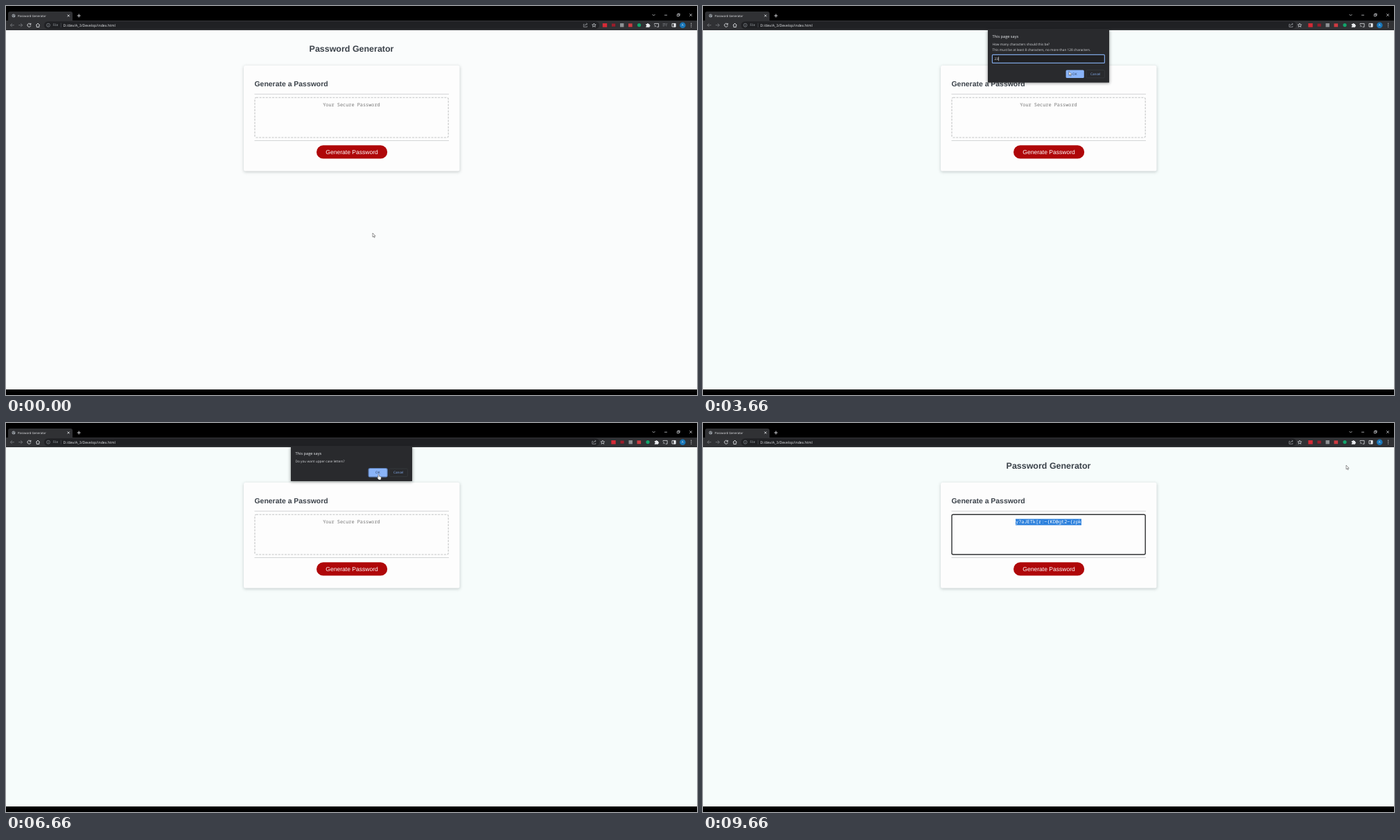
An HTML page that plays this animation: 997 by 562 pixels, repeating every 9730 ms.

```html
<!DOCTYPE html>
<html lang="en">
<head>
<meta charset="utf-8">
<title>Password Generator</title>
<style>
  html, body { margin: 0; width: 100%; height: 100%; overflow: hidden; background: #000; }
  svg { display: block; width: 100%; height: 100%; }
  text { text-rendering: geometricPrecision; white-space: pre; }
  .ui { font-family: "Open Sans", "Noto Sans", sans-serif; }
  .page { font-family: "Liberation Sans", Arial, sans-serif; fill: #3b424a; }
  .mono { font-family: "Noto Sans Mono", "DejaVu Sans Mono", monospace; font-size: 6.88px; }
  .bold { font-weight: bold; }
  .mid { text-anchor: middle; }
  .line { fill: none; stroke: #dfe1e5; stroke-width: .9; }
</style>
</head>
<body>
<svg viewBox="0 0 997 562" preserveAspectRatio="none">
  <defs>
    <filter id="soft" x="-10%" y="-10%" width="120%" height="125%"><feGaussianBlur stdDeviation="2"/></filter>
  </defs>

  <!-- Browser frame -->
  <rect width="997" height="562" fill="#000"/>
  <path d="M0 21H3V11q0-3 3-3H93q3 0 3 3V21H997V35H0Z" fill="#303134"/>
  <rect x="55" y="22.2" width="801" height="11" rx="5.5" fill="#202124"/>
  <g class="ui">
    <circle cx="11" cy="14" r="2.5" fill="#9aa0a6"/>
    <path d="M9 13.2l2 .7-.6 2M11.5 11.8l.3 1.3 1.5.6" class="line" style="stroke:#35363a;stroke-width:.6"/>
    <text x="17" y="15.6" font-size="4.3" fill="#e8eaed">Password Generator</text>
    <text x="67.5" y="29.4" font-size="4.8" fill="#9aa0a6">File</text>
    <text x="82.5" y="29.5" font-size="5.2" fill="#e8eaed">D:/dev/A_3/Develop/index.html</text>
  </g>
  <g class="line">
    <path d="M88.7 12.5l3 3m0-3l-3 3M102.7 14h5m-2.5-2.5v5"/>
    <path d="M11.8 27.7H6.3m2.5-2.5l-2.5 2.5 2.5 2.5M18.2 27.7h5.5m-2.5-2.5l2.5 2.5-2.5 2.5" stroke="#74777b"/>
    <path d="M35.4 26.2a2.5 2.5 0 1 0 .4 2.2M35.8 24.8v2h-2M43.2 27.8l2.8-2.8 2.8 2.8M44.2 27.3v3.2h3.6v-3.2"/>
    <path d="M61 27.3v1.8M61 25.9v.5M58.5 27.7a2.5 2.5 0 1 0 5 0a2.5 2.5 0 1 0-5 0" stroke="#9aa0a6" stroke-width=".6"/>
    <path d="M79.3 24.5v6.5" stroke="#5f6368" stroke-width=".5"/>
    <path d="M932.5 12l2 2 2-2M950 13.2h4M968.3 12h2.8v2.8h-2.8zM969.3 12v-1h2.8v2.8h-1M986.2 11.2l3.6 3.6m0-3.6l-3.6 3.6" stroke-width=".7"/>
    <path d="M961 25.4h5v4.6h-5z"/>
  </g>
  <rect x="963.5" y="25" width="2.8" height="5.4" fill="#e8eaed"/>
  <circle cx="976.3" cy="27.7" r="4.3" fill="#1976b8"/>
  <text class="ui mid" x="976.3" y="29.4" font-size="4.5" fill="#d7e8f5">A</text>
  <path d="M988.7 25.2v.1m0 2.3v.1m0 2.3v.1" class="line" stroke-linecap="round" style="stroke-width:1.2"/>
  <g id="tools">
    <path class="line" style="stroke:#a5a8ac;stroke-width:.7" d="M834.5 26.3h-1.2v4h5v-1.5M835 28.8q.2-2.8 3.5-2.8m-1.2-1.3l1.4 1.3-1.4 1.3"/>
    <path class="line" style="stroke-width:.7" d="M848.4 25l.8 1.8 2 .2-1.5 1.3.5 2-1.8-1.1-1.8 1.1.5-2-1.5-1.3 2-.2z"/>
    <rect x="860.8" y="25" width="6.4" height="5.6" fill="#d52a36"/>
    <rect x="874" y="25.5" width="5.2" height="4.2" fill="#9c1c2a"/>
    <rect x="886" y="25" width="5.4" height="5.4" fill="#8e9194"/>
    <rect x="898" y="25.3" width="5.6" height="5" fill="#cf3b42"/>
    <circle cx="913.5" cy="27.6" r="2.6" fill="#12a56b"/>
    <path fill="#e8eaed" d="M923.3 26h1.6a1.1 1.1 0 0 1 2.2 0h1.4v1.5a1.1 1.1 0 0 1 0 2.2v1h-5.2v-1.3a.9.9 0 0 0 0-1.8z"/>
    <path class="line" style="stroke-width:.8" d="M935.6 26.8v-1.4h6v4.8h-2.4M935.6 28.2q2 0 2 2M935.6 29.7v.5"/>
  </g>
  <path id="media" class="line" style="stroke:#74777b;stroke-width:.8" d="M947.6 25.5h4M947.6 27.2h4M947.6 29h2.4M952.8 29.5v-3.8h1.5"/>

  <!-- Page -->
  <rect id="paper" y="35" width="997" height="519" fill="#f6fcfb"/>
  <text class="page bold mid" x="498.5" y="66.2" font-size="12.46">Password Generator</text>
  <rect x="343" y="87" width="312" height="153" rx="2" fill="#8a9696" opacity=".45" filter="url(#soft)"/>
  <rect x="343" y="86" width="311.5" height="152.5" rx="2.5" fill="#fdfdfd"/>
  <text class="page bold" x="358.5" y="115.6" font-size="10.45">Generate a Password</text>
  <path d="M358.5 127.3H639M358.5 194.5H639" stroke="#cfd1d2" stroke-width=".9"/>
  <rect id="box" x="359" y="132.3" width="279.2" height="57.7" rx="2" fill="#fdfdfd"/>
  <rect id="selection" x="451" y="138.6" width="95" height="9" fill="#2a7fdc"/>
  <text id="output" class="mono mid" x="498.5" y="145.4"></text>
  <rect x="448" y="201.3" width="102.2" height="19.3" rx="9.65" fill="#af0709"/>
  <text class="page mid" x="499.1" y="214" font-size="8.55" style="fill:#fff">Generate Password</text>

  <!-- Dialog -->
  <g id="dialog" class="ui">
    <rect id="shade" x="410.5" y="35" width="176" fill="#000" opacity=".4" filter="url(#soft)"/>
    <rect id="panel" x="411" y="33" width="175" fill="#292a2d"/>
    <text x="417.5" y="46.1" font-size="5.62" fill="#e8eaed">This page says</text>
    <text id="message" x="417.5" y="57.2" font-size="4.78" fill="#d5d7da"></text>
    <g id="field">
      <text x="417.5" y="65.1" font-size="4.78" fill="#d5d7da">This must be at least 8 characters, no more than 128 characters.</text>
      <rect x="417.4" y="70.4" width="162" height="12" rx="1" fill="#202124" stroke="#7da4e0" stroke-width="1.2"/>
      <text id="typed" x="420.5" y="78.2" font-size="4.8" fill="#e8eaed"></text>
      <rect id="caret" y="73.3" width=".6" height="6" fill="#e8eaed"/>
    </g>
    <g id="buttons">
      <rect id="ring" x="523.2" y="-6.1" width="26.9" height="12.2" rx="2" fill="none" stroke="#5a7db5" stroke-width="1.3"/>
      <rect x="523.6" y="-5.8" width="26.2" height="11.6" rx="1.6" fill="#8ab4f8"/>
      <text class="mid" x="536.3" y="1.7" font-size="4.7" fill="#2b3c58">OK</text>
      <rect x="553" y="-5.7" width="26.4" height="11.4" rx="1.6" fill="none" stroke="#3c4043" stroke-width=".6"/>
      <text class="mid" x="566.2" y="1.7" font-size="4.7" fill="#8ab4f8">Cancel</text>
    </g>
  </g>

  <!-- Pointer -->
  <g id="pointer" stroke-linejoin="round">
    <path id="arrow" d="M0 0V5.8L1.4 4.6 2.3 6.7 3.2 6.3 2.3 4.3H4.1Z" fill="#fff" stroke="#333" stroke-width=".5"/>
    <path id="hand" d="M-.6 4.2V.4q0-.8.7-.8t.7.8V2.6l2.2.5q.9.3.8 1.2L3.3 7.5H.2L-1.9 4.6q-.1-.9.8-.8Z" fill="#fff" stroke="#444" stroke-width=".5"/>
    <path id="beam" d="M-1.2-3.8Q0-3.8 0-3V3Q0 3.8-1.2 3.8M1.2-3.8Q0-3.8 0-3M0 3Q0 3.8 1.2 3.8" fill="none" stroke="#333" stroke-width=".6"/>
  </g>
</svg>
<script>
const LOOP = 9730, TICK = 200 / 3;
const SECRET = "y?aJETk[r:~{KD@gt2~{zpk";
const $ = id => document.getElementById(id);
const clamp = v => Math.max(0, Math.min(1, v));
const ease = v => v * v * (3 - 2 * v);
const show = (id, on) => $(id).setAttribute("display", on ? "inline" : "none");
const set = (id, attrs) => Object.entries(attrs).forEach(([k, v]) => $(id).setAttribute(k, v));

// [start, end, message, isPrompt]
const dialogs = [
  [1400, 3760, "How many characters should this be?", true],
  [3880, 4930, "Do you want special characters?"],
  [5040, 5600, "Do you want numbers?"],
  [5700, 6330, "Do you want lower case letters?"],
  [6430, 7130, "Do you want upper case letters?"]
];

// [start, end, x, y]: the pointer glides to x, y
const moves = [
  [0, 0, 529, 328],
  [500, 1140, 519, 212],
  [1700, 2340, 541, 105],
  [3420, 3640, 528, 94.5],
  [4000, 4400, 537.5, 74.5],
  [7620, 8060, 511, 143],
  [9350, 9650, 928, 61]
];

// [start, shape]
const shapes = [[0, "arrow"], [1000, "hand"], [1780, "arrow"], [4380, "hand"],
  [7680, "arrow"], [7900, "beam"], [9390, "arrow"]];

function pointerAt(t) {
  let x = 0, y = 0;
  for (const [start, end, toX, toY] of moves) {
    if (t < start) break;
    const k = end > start ? ease(clamp((t - start) / (end - start))) : 1;
    x += (toX - x) * k;
    y += (toY - y) * k;
  }
  return [x, y];
}

function drawDialog(t) {
  const current = dialogs.find(([start, end]) => t >= start && t < end + 110);
  show("dialog", current);
  if (!current) return;
  const [start, end, message, isPrompt] = current;
  const opening = clamp((t - start) / 150);
  const opacity = Math.min(opening, 1 - clamp((t - end) / 110));
  const height = isPrompt ? 77.6 : 51;
  set("dialog", {
    opacity,
    transform: `translate(0 ${-18 * (1 - opacity) ** 1.0})`
  });
  set("panel", { height });
  set("shade", { height: height - 1 });
  $("message").textContent = message;
  show("field", isPrompt);
  show("ring", !isPrompt);
  set("buttons", { transform: `translate(0 ${isPrompt ? 98.2 : 71.7})` });
  const typed = t < 2930 ? "" : t < 3130 ? "2" : "23";
  $("typed").textContent = typed;
  set("caret", { x: 420.5 + typed.length * 2.75 });
}

function draw(t) {
  const focused = t >= 8195, selected = t >= 8395, done = t >= 7325;
  set("paper", { fill: t < 530 ? "#fafcfc" : "#f6fcfb" });
  show("media", t < 1930);
  set("tools", { transform: `translate(${t < 1930 ? 0 : 12.5} 0)` });

  set("box", focused
    ? { stroke: "#303234", "stroke-width": 1.4, "stroke-dasharray": "none" }
    : { stroke: "#c3c5c6", "stroke-width": 1.1, "stroke-dasharray": "3 1.6" });
  show("selection", selected);
  $("output").textContent = done ? SECRET : "Your Secure Password";
  set("output", { fill: selected ? "#fff" : done ? "#333" : "#777" });

  drawDialog(t);

  const shape = shapes.filter(([start]) => t >= start).pop()[1];
  for (const id of ["arrow", "hand", "beam"]) show(id, id === shape);
  set("pointer", { transform: `translate(${pointerAt(t)})` });
}

const began = performance.now();
function frame() {
  const t = (performance.now() - began) % LOOP;
  draw(Math.floor((t + 8) / TICK) * TICK);
  requestAnimationFrame(frame);
}
draw(0);
requestAnimationFrame(frame);
</script>
</body>
</html>
```
